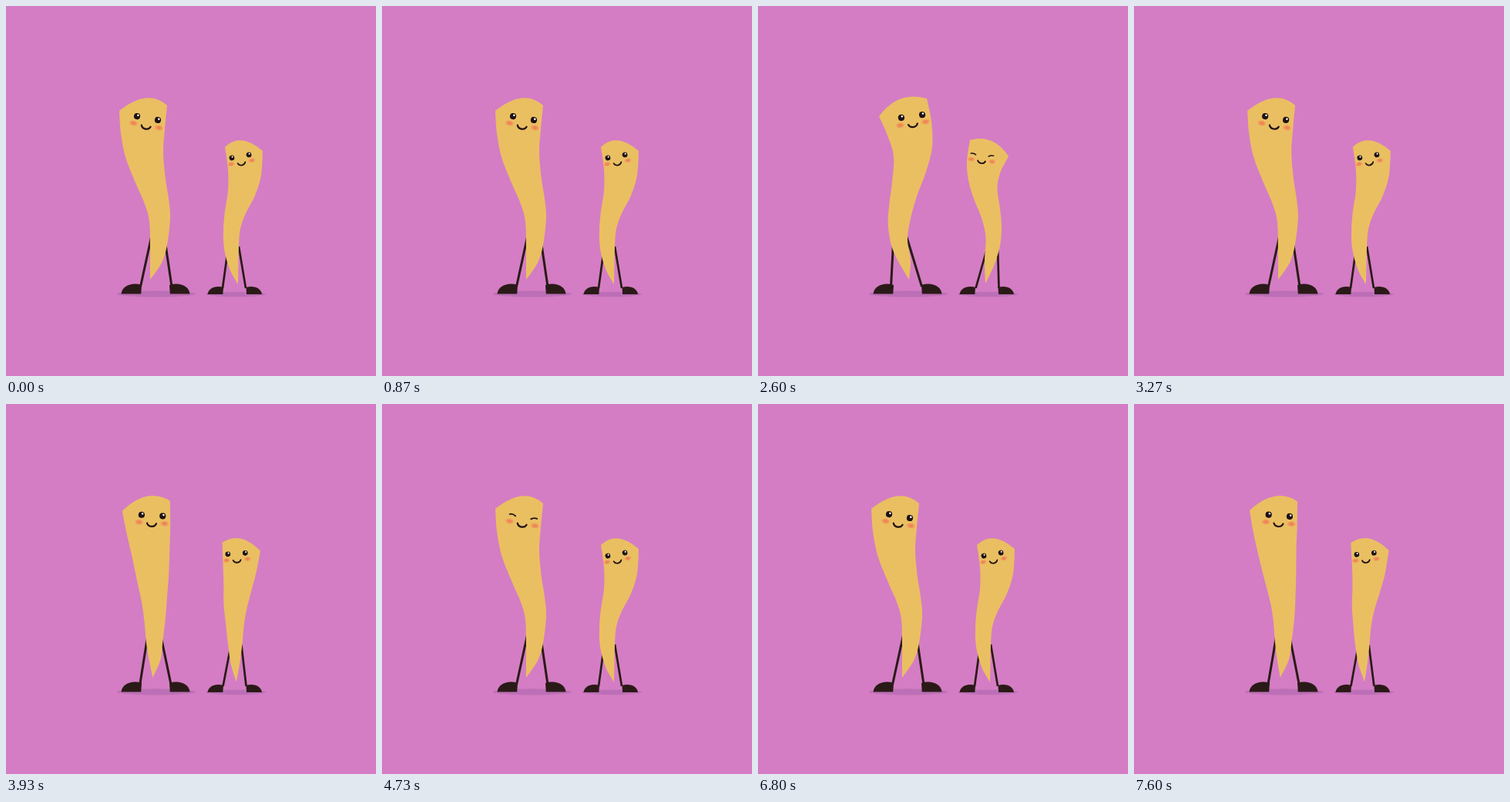
Write an HTML page with a canvas that moves like this. It is 480 by 480 pixels and loops after 7.67 s.

```html
<!DOCTYPE html>
<html lang="en">
<head>
<meta charset="utf-8">
<title>Dancing parsnips</title>
<style>
html, body { margin: 0; width: 100%; height: 100%; overflow: hidden; background: #d47dc4; }
canvas { display: block; width: 480px; height: 480px; }
</style>
</head>
<body>
<canvas id="stage" width="480" height="480"></canvas>
<script>
const ctx = document.getElementById('stage').getContext('2d');
const LOOP = 7670, STEP = 1000 / 15;
const DARK = '#2a1a17', BODY = '#eabf62', SHADE = '#bc6fb6';

// Each outline is [pose leaning left, pose leaning right] as x, y pairs, from the crown to the tip.
const tall = {
  left: [
    [147,136, 149,165, 155,196, 167,227, 180,257, 186,280, 187,315, 187,355],
    [157,143, 168,168, 176,195, 174,228, 170,260, 169,287, 176,319, 196,355]],
  right: [
    [209,129, 206,160, 204,190, 207,225, 211,250, 213,275, 209,310, 202,333, 187,355],
    [219,120, 225,150, 226,183, 218,215, 206,247, 197,280, 194,305, 198,330, 196,355]],
  crown: [[184,106.5], [182,109.5]],
  face: [[183.5,145.5, 0.18], [199.5,143, -0.14]],
  scale: 1,
  legs: [[190,293, 206,303, 174.5,364, 215,364], [176,298, 193,300, 172.5,364, 212.5,364]],
  legWidth: 3,
  feet: [149.5, 238.5, 26.5, 13.5, 373.5],
  shadow: [195, 373.5, 51, 4],
  blink: 20
};
const small = {
  left: [
    [284,183, 288,212, 288,240, 284,266, 282,290, 283,315, 290,341, 301,361],
    [275,174, 271,202, 273,226, 280,250, 290,275, 295.5,300, 294,329, 295,360]],
  right: [
    [333,188, 331,220, 323,246, 311,269, 304,289, 302,311, 301.5,336, 301,361],
    [325,195, 314,217, 310.5,237, 314,263, 316,287, 314,311, 306,337, 295,360]],
  crown: [[304,163.5], [305,165.5]],
  face: [[304,195, -0.18], [291,192.5, 0.12]],
  scale: 0.82,
  legs: [[288,315, 302,312, 281,366, 311,366], [296.5,317, 311,314, 282.5,366, 312.5,366]],
  legWidth: 2.7,
  feet: [261.5, 332, 20.5, 10.5, 374],
  shadow: [298, 374, 39, 3.2],
  blink: 38
};

const blend = ([a, b], k) => a.map((v, i) => v + (b[i] - v) * k);

// Sway from 0 (left) to 1 (right), resting briefly at both ends.
function sway(frame) {
  const x = -Math.cos(2 * Math.PI * (frame * 0.1375 + 0.114));
  return (Math.max(-1, Math.min(1, x * 1.65)) + 1) / 2;
}

// Smooth curve through the points, continuing the current path.
function curve(p) {
  const n = p.length / 2;
  const at = i => {
    const j = 2 * Math.max(0, Math.min(n - 1, i));
    return [p[j], p[j + 1]];
  };
  for (let i = 0; i < n - 1; i++) {
    const [a, b, c, d] = [at(i - 1), at(i), at(i + 1), at(i + 2)];
    ctx.bezierCurveTo(
      b[0] + (c[0] - a[0]) / 6, b[1] + (c[1] - a[1]) / 6,
      c[0] - (d[0] - b[0]) / 6, c[1] - (d[1] - b[1]) / 6, c[0], c[1]);
  }
}

function reversed(p) {
  const out = [];
  for (let i = p.length - 2; i >= 0; i -= 2) out.push(p[i], p[i + 1]);
  return out;
}

function ellipse(x, y, rx, ry, fill) {
  ctx.fillStyle = fill;
  ctx.beginPath();
  ctx.ellipse(x, y, rx, ry, 0, 0, 2 * Math.PI);
  ctx.fill();
}

function foot(x, dir, w, h, y) {
  ctx.fillStyle = DARK;
  ctx.beginPath();
  ctx.moveTo(x, y);
  ctx.bezierCurveTo(x + dir * w * 0.04, y - h * 0.75, x + dir * w * 0.5, y - h * 1.15, x + dir * w, y - h * 0.86);
  ctx.lineTo(x + dir * w * 0.97, y);
  ctx.fill();
}

function drawLegs(who, k) {
  const [ax, ay, bx, by, cx, cy, dx, dy] = blend(who.legs, k);
  ctx.strokeStyle = DARK;
  ctx.lineWidth = who.legWidth;
  ctx.beginPath();
  ctx.moveTo(ax, ay);
  ctx.lineTo(cx, cy);
  ctx.moveTo(bx, by);
  ctx.lineTo(dx, dy);
  ctx.stroke();
  const [l, r, w, h, y] = who.feet;
  foot(l, 1, w, h, y);
  foot(r, -1, w, h, y);
}

function drawBody(who, k) {
  const left = blend(who.left, k), right = blend(who.right, k);
  const [cx, cy] = blend(who.crown, k);
  ctx.fillStyle = BODY;
  ctx.beginPath();
  ctx.moveTo(left[0], left[1]);
  ctx.quadraticCurveTo(cx, cy, right[0], right[1]);
  curve(right);
  curve(reversed(left));
  ctx.fill();
}

function cheek(x, y) {
  ctx.save();
  ctx.translate(x, y);
  ctx.scale(1, 0.65);
  const glow = ctx.createRadialGradient(0, 0, 0, 0, 0, 6.5);
  glow.addColorStop(0, 'rgba(242,118,82,0.95)');
  glow.addColorStop(0.5, 'rgba(242,126,84,0.7)');
  glow.addColorStop(1, 'rgba(240,150,90,0)');
  ellipse(0, 0, 6.5, 6.5, glow);
  ctx.restore();
}

function openEye(x) {
  ellipse(x, 0, 4.1, 4.1, '#1e1212');
  ellipse(x + 1.1, -1.5, 1.3, 1.3, '#fff');
}

function closedEye(x, tilt) {
  ctx.save();
  ctx.translate(x, 0.5);
  ctx.rotate(tilt);
  ctx.lineWidth = 1.8;
  ctx.beginPath();
  ctx.moveTo(-4, 0.6);
  ctx.quadraticCurveTo(0, -1.4, 4, 0.6);
  ctx.stroke();
  ctx.restore();
}

function drawFace(who, k, shut) {
  const [x, y, turn] = blend(who.face, k);
  ctx.save();
  ctx.translate(x, y);
  ctx.rotate(turn);
  ctx.scale(who.scale, who.scale);
  ctx.strokeStyle = '#1e1212';
  ctx.lineCap = 'round';
  cheek(-16.5, 9.6);
  cheek(16.8, 9.6);
  if (shut) {
    closedEye(-14, 0.14);
    closedEye(14, -0.25);
  } else {
    openEye(-13.7);
    openEye(13.7);
  }
  ctx.lineWidth = 2.2;
  ctx.beginPath();
  ctx.moveTo(-6, 10.3);
  ctx.bezierCurveTo(-4, 15.6, 4, 15.6, 6, 10.3);
  ctx.stroke();
  ctx.restore();
}

function draw(frame) {
  ctx.fillStyle = '#d47dc4';
  ctx.fillRect(0, 0, 480, 480);
  const k = sway(frame);
  for (const who of [tall, small]) {
    const shut = frame % 50 >= who.blink && frame % 50 < who.blink + 3;
    ellipse(...who.shadow, SHADE);
    drawLegs(who, k);
    drawBody(who, k);
    drawFace(who, k, shut);
  }
}

const start = performance.now();
function tick() {
  const t = (performance.now() - start) % LOOP;
  draw(Math.min(114, Math.floor((t + 4) / STEP)));
  requestAnimationFrame(tick);
}
tick();
</script>
</body>
</html>
```
